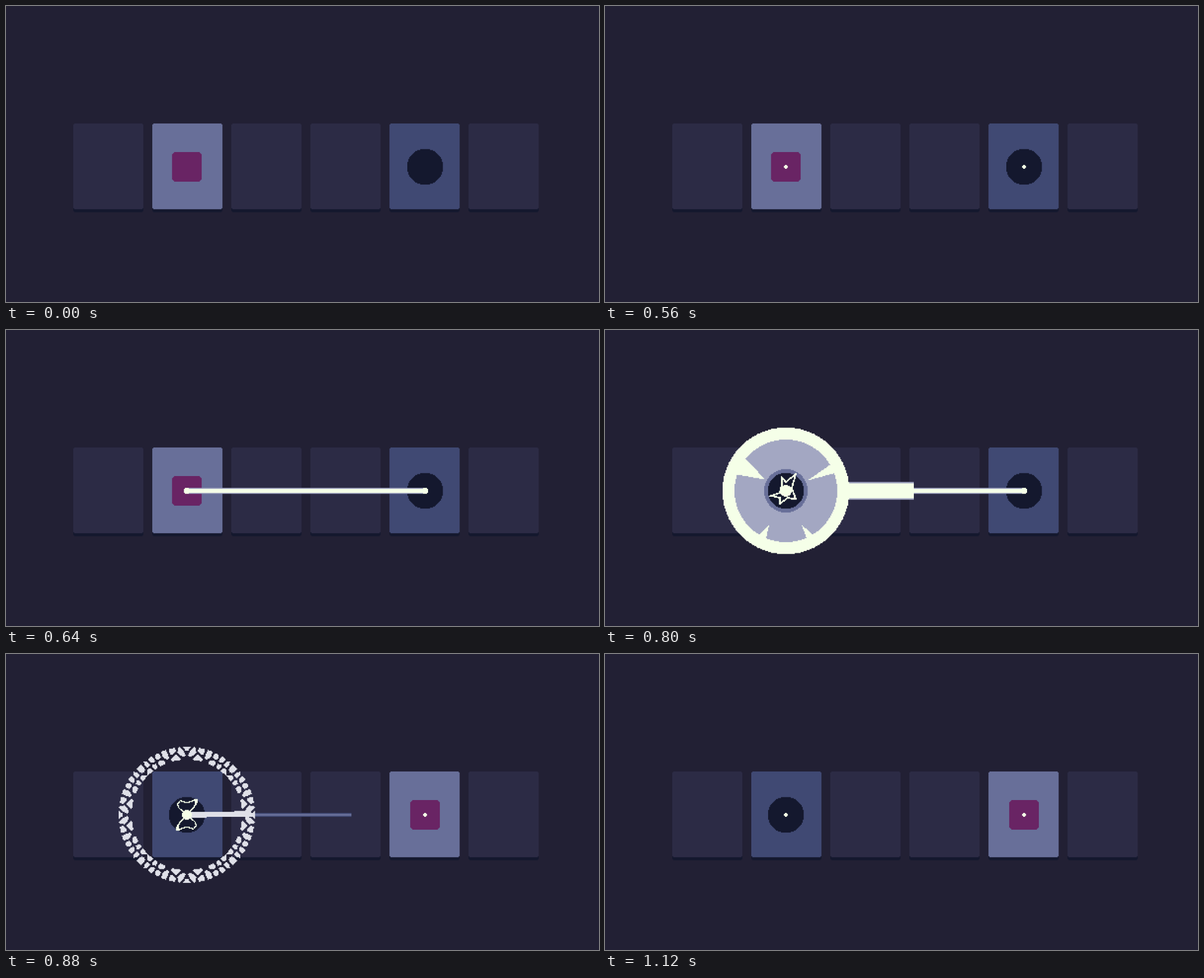
An HTML page with a canvas for the animation above (1.2 s loop, 1058 px wide and 529 px high).

```html
<!DOCTYPE html>
<html lang="en">
<head>
<meta charset="utf-8">
<title>Card swap</title>
<style>
  html, body { margin: 0; width: 100%; height: 100%; overflow: hidden; background: #222034; }
  canvas { display: block; width: 1058px; height: 529px; }
</style>
</head>
<body>
<canvas width="1200" height="600"></canvas>
<script>
const ctx = document.querySelector('canvas').getContext('2d');
const WHITE = '#f5ffe8', PALE = '#dfe0e8', GREY = '#a3a7c2', SLATE = '#686f99',
      BLUE = '#404973', NAVY = '#14182e', PANEL = '#2c2b45', PLUM = '#692464', BACK = '#222034';
const LEFT = 183, RIGHT = 424, MID = 163, PIXEL = 2;

// All drawing is in chunky pixels on a 600 by 300 grid.
function rect(color, x, y, w, h) {
  ctx.fillStyle = color;
  ctx.fillRect(x * PIXEL, y * PIXEL, w * PIXEL, h * PIXEL);
}

// Fill every pixel around (cx, MID) whose centre passes the test.
function plot(color, cx, reach, test) {
  for (let y = -reach; y < reach; y++)
    for (let x = -reach; x < reach; x++)
      if (test(x + .5, y + .5)) rect(color, cx + x, MID + y, 1, 1);
}

const disc = (color, cx, r) => plot(color, cx, Math.ceil(r), (x, y) => Math.hypot(x, y) <= r);

// Polygon points are relative to the left card's centre.
const shape = points => new Path2D('M' + points + 'Z');
const fill = (color, points) => {
  const path = shape(points);
  plot(color, LEFT, 66, (x, y) => ctx.isPointInPath(path, x, y));
};
const stroke = (color, points, width) => {
  const path = shape(points);
  ctx.lineWidth = width;
  plot(color, LEFT, 24, (x, y) => ctx.isPointInStroke(path, x, y));
};

function rounded(color, x, y, w, h, insets) {
  insets.forEach((inset, i) => {
    rect(color, x + inset, y + i, w - 2 * inset, 1);
    rect(color, x + inset, y + h - 1 - i, w - 2 * inset, 1);
  });
  rect(color, x, y + insets.length, w, h - 2 * insets.length);
}

function drawCards(swapped) {
  rect(BACK, 0, 0, 600, 300);
  const squareSlot = swapped ? 4 : 1, circleSlot = 5 - squareSlot;
  for (let i = 0; i < 6; i++) {
    const x = 68 + 80 * i;
    rounded(NAVY, x, 122, 71, 87, [1]);
    rounded(i === squareSlot ? SLATE : i === circleSlot ? BLUE : PANEL, x, 119, 71, 87, [1]);
  }
  rounded(PLUM, (swapped ? RIGHT : LEFT) - 15, MID - 15, 30, 30, [2, 1]);
  disc(NAVY, swapped ? LEFT : RIGHT, 18.2);
}

function beam(from, to, half, edge, core = WHITE, rim = GREY) {
  rect(rim, from, MID - half, to - from, 2 * half);
  rect(core, from, MID - half + edge, to - from, 2 * (half - edge));
}

function dots(r) {
  disc(WHITE, LEFT, r);
  disc(WHITE, RIGHT, r);
}

// Shard centres in one eighth of the broken ring; the rest is mirrored.
const shards = [[68, 0], [63.5, 6], [58, 11], [64, 15], [61, 22], [57.5, 29], [53.5, 27],
                [54.5, 35], [49.5, 33], [50, 40], [45.5, 37.5], [46.5, 45]];

function shatter(color, scale, gap, size) {
  plot(color, LEFT, 76, (x, y) => {
    const u = Math.max(Math.abs(x), Math.abs(y)) / scale;
    const v = Math.min(Math.abs(x), Math.abs(y)) / scale;
    const r = Math.hypot(u, v);
    if (r < 56 || r > 69 || (v < 1 && r < 65)) return false;
    const [a, b] = shards.map(([p, q]) => Math.hypot(u - p, v - q)).sort((m, n) => m - n);
    return a < size && b - a > gap;
  });
}

const scenes = {
  6() { dots(1); },
  7() { dots(2); },
  8() {
    beam(LEFT, RIGHT, 3, 1);
    dots(3.2);
  },
  9() {
    beam(LEFT, RIGHT, 3, 1);
    disc(WHITE, RIGHT, 3.2);
    beam(LEFT, 362, 8, 2);
    for (let i = 0; i < 3; i++) rect(WHITE, 362 + i, MID - 7 + 2 * i, 1, 14 - 2 * i);
    disc(WHITE, LEFT, 62.2);
    disc(SLATE, LEFT, 22);
    disc(WHITE, LEFT, 18.5);
  },
  10() {
    beam(LEFT, RIGHT, 3, 1);
    disc(WHITE, RIGHT, 3.2);
    beam(LEFT, 312.5, 9, 1.5);
    disc(WHITE, LEFT, 64.2);
    disc(GREY, LEFT, 52);
    for (const wedge of ['-21,-11.5 -42,-34 -53,-17', '22,-10.5 47,-28 53,-19',
                         '-17,35 -29,46 -21,52', '16,34.5 22,51 29,46']) fill(WHITE, wedge);
    disc(SLATE, LEFT, 22);
    disc(NAVY, LEFT, 18.3);
    stroke(WHITE, '-4.5,-14 0,-9 10,-17 6,-3 10,8.5 2,7 -6,13 -6,7 -15,5 -6,2 -4,-6', 1.7);
    disc(WHITE, LEFT, 6);
  },
  11() {
    shatter(PALE, 1, 2, 5.5);
    stroke(WHITE, '0,0 -8,-7 -9.5,-11 -6.5,-14.5 0,-12 9,-15.5 10.5,-13 6.5,-7 '
      + '0,0 8,7 9.5,11 6.5,14.5 0,12 -9,15.5 -10.5,13 -6.5,7', 1.2);
    fill(WHITE, '7,-15 10.5,-16 11,-13 8.5,-11.5');
    fill(WHITE, '-7,15 -10.5,16 -11,13 -8.5,11.5');
    beam(252, 349.5, 2, 1, SLATE, BLUE);
    fill(PALE, '3,-2.7 65,-3.8 65,1.7 3,2.8');
    disc(WHITE, LEFT, 5);
    disc(WHITE, RIGHT, 2);
  },
  12() {
    shatter(GREY, 1.03, 3.6, 4);
    beam(LEFT, 247, 1, 0, SLATE, SLATE);
    disc(WHITE, LEFT, 3.2);
    disc(WHITE, RIGHT, 2);
  },
  13() {
    shatter(SLATE, 1.05, 4, 2);
    dots(2);
  },
  14() { dots(2); }
};

let shown = -1;
function tick() {
  const step = Math.floor(performance.now() % 1200 / 80);
  if (step !== shown) {
    shown = step;
    drawCards(step >= 11);
    scenes[step]?.();
  }
  requestAnimationFrame(tick);
}
tick();
</script>
</body>
</html>
```
